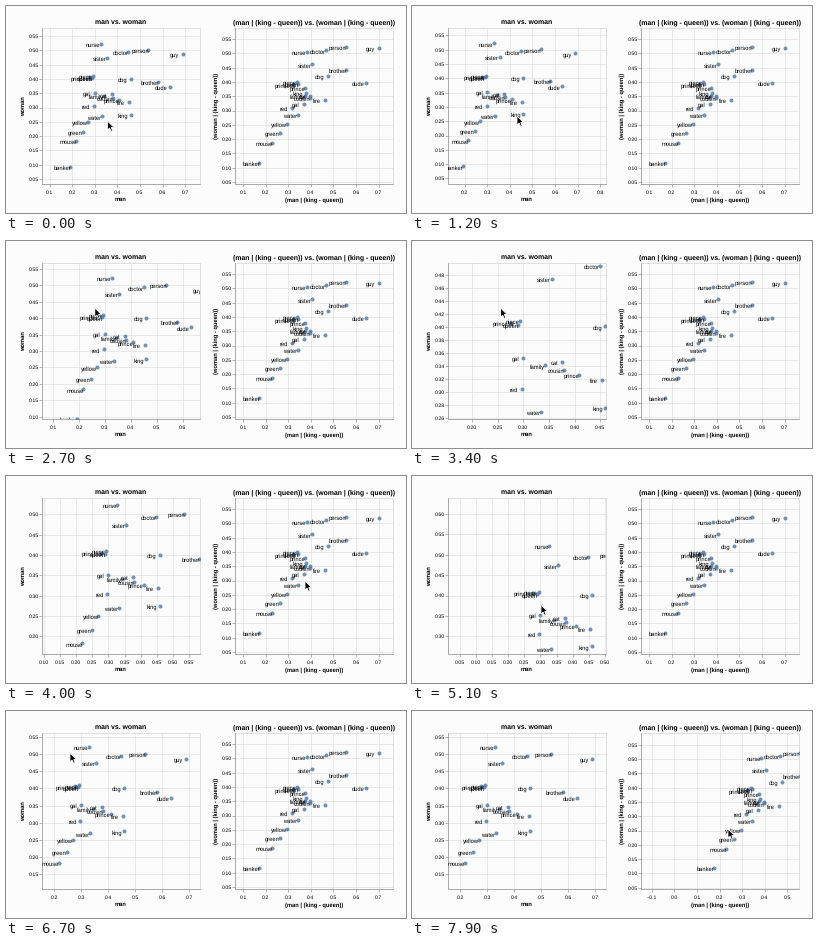
A matplotlib script for the animation above (8000 ms loop, 400 by 207 pixels).

```python
import math

import matplotlib.pyplot as plt
import numpy as np
from matplotlib.animation import FuncAnimation
from matplotlib.collections import LineCollection
from matplotlib.patches import Polygon, Rectangle

plt.rcParams["font.family"] = "Liberation Sans"
plt.rcParams["text.hinting"] = "none"

STAGE_W, STAGE_H = 400, 207
DPI = 128  # a power of two keeps the pixel size exact
FRAMES, INTERVAL = 80, 100
PLOT_W, PLOT_H, TOP = 158, 156, 22
BOTTOM = TOP + PLOT_H
SPAN_X, SPAN_Y = PLOT_W / 226, PLOT_H / 286  # data range at zoom 1
LABEL_DX, LABEL_DY = -7.9, 3.1

# word: left plot x, y, right plot x, y
WORDS = {
    "nurse": (0.328, 0.522, 0.384, 0.504),
    "doctor": (0.449, 0.494, 0.466, 0.510),
    "person": (0.536, 0.501, 0.554, 0.522),
    "guy": (0.689, 0.487, 0.700, 0.519),
    "sister": (0.356, 0.474, 0.407, 0.461),
    "dog": (0.460, 0.401, 0.475, 0.421),
    "brother": (0.580, 0.390, 0.554, 0.442),
    "dude": (0.631, 0.372, 0.643, 0.397),
    "niece": (0.294, 0.409, 0.340, 0.400),
    "princess": (0.276, 0.406, 0.322, 0.391),
    "queen": (0.290, 0.403, 0.345, 0.394),
    "gal": (0.300, 0.352, 0.369, 0.323),
    "family": (0.343, 0.341, 0.374, 0.352),
    "cat": (0.376, 0.346, 0.397, 0.351),
    "cousin": (0.380, 0.334, 0.395, 0.345),
    "prince": (0.409, 0.326, 0.374, 0.379),
    "fire": (0.453, 0.319, 0.462, 0.337),
    "red": (0.297, 0.305, 0.316, 0.309),
    "water": (0.334, 0.269, 0.343, 0.284),
    "king": (0.460, 0.275, 0.378, 0.361),
    "yellow": (0.269, 0.250, 0.294, 0.253),
    "green": (0.248, 0.216, 0.263, 0.221),
    "mouse": (0.217, 0.183, 0.230, 0.186),
    "banker": (0.191, 0.092, 0.173, 0.118),
}

# step, domain left, domain top, domain size relative to the first view
LEFT_VIEWS = np.array([
    (0, 0.0668, 0.578, 1), (5, 0.0668, 0.578, 1),
    (12, 0.1265, 0.576, 1), (14, 0.135, 0.580, 1),
    (18, 0.027, 0.587, 1), (24, 0.027, 0.587, 1),
    (27, 0.0571, 0.5685, 0.8726), (33, 0.1531, 0.4985, 0.4405),
    (34, 0.1531, 0.4985, 0.4405), (37, 0.0937, 0.5398, 0.702),
    (49, 0.0937, 0.5398, 0.702), (51, 0.0128, 0.6394, 0.702),
    (54, 0.1057, 0.5926, 0.702), (57, 0.1057, 0.5926, 0.702),
    (60, 0.0706, 0.6324, 0.834), (62, 0.0706, 0.6324, 0.834),
    (67, 0.1559, 0.5618, 0.834),
])
RIGHT_VIEWS = np.array([
    (0, 0.0647, 0.5885, 1), (74, 0.0647, 0.5885, 1), (79, -0.148, 0.591, 1),
])
# step, x, y of the pointer tip
POINTER_PATH = np.array([
    (0, 101.5, 115), (1, 105, 85), (2, 110, 47.5), (3, 115, 82),
    (4, 118.5, 110.5), (5, 118.5, 110.5), (12, 105, 110), (14, 103, 111),
    (18, 127.5, 113), (22, 89, 67), (37, 88.5, 67), (40, 299, 105),
    (46, 299, 105), (49, 103, 89), (51, 129, 129), (54, 95, 106),
    (60, 95, 106), (62, 87, 66.5), (67, 64, 42), (68, 64, 42),
    (69, 110, 75), (70, 180, 110), (71, 240, 133), (72, 268.5, 117),
    (74, 268.5, 117), (79, 316, 118),
])
ARROW = np.array([(0, 0), (0, 9), (2.1, 7.1), (3.6, 10.4), (5.1, 9.7),
                  (3.7, 6.5), (6.5, 6.4)])


def at_step(path, step):
    return [np.interp(step, path[:, 0], col) for col in path.T[1:]]


def px(size):
    return size * 72 / DPI


def ticks(low, high, count=8):
    """Round tick values and the number of decimals to show."""
    raw = (high - low) / count
    power = 10 ** math.floor(math.log10(raw))
    ratio = raw / power
    factor = 10 if ratio >= 50 ** 0.5 else 5 if ratio >= 10 ** 0.5 \
        else 2 if ratio >= 2 ** 0.5 else 1
    step = factor * power
    first, last = math.ceil(low / step - 1e-6), math.floor(high / step + 1e-6)
    decimals = max(0, -math.floor(math.log10(step) + 1e-9))
    return [i * step for i in range(first, last + 1)], decimals


def tick_text(value, decimals):
    return f"{value:.{decimals}f}".replace("-", "\u2212")


fig = plt.figure(figsize=(STAGE_W / DPI, STAGE_H / DPI), dpi=DPI,
                 facecolor="#fcfcfd")
ax = fig.add_axes([0, 0, 1, 1])
ax.set_xlim(0, STAGE_W)
ax.set_ylim(STAGE_H, 0)
ax.axis("off")


class Panel:
    def __init__(self, left, columns, views, x_name, y_name, y_name_x):
        self.left, self.views = left, views
        self.data = np.array([WORDS[w][columns] for w in WORDS])
        self.grid = self.add_lines("#dddddd", 0.6, 1)
        self.marks = self.add_lines("#888888", 0.6, 2)
        box = Rectangle((left, TOP), PLOT_W, PLOT_H, fill=False,
                        ec="#cccccc", lw=px(0.6), zorder=2)
        ax.add_patch(box)
        ax.plot([left, left, left + PLOT_W], [TOP, BOTTOM, BOTTOM],
                color="#888888", lw=px(0.6), zorder=2)

        self.dots = ax.scatter(*self.data.T, s=px(4) ** 2, c="#4c78a8",
                               alpha=0.8, lw=0, zorder=3)
        self.dots.set_clip_path(box)
        self.labels = [ax.text(0, 0, w, fontsize=px(5.8), ha="center",
                               va="baseline", zorder=4) for w in WORDS]
        for label in self.labels:
            label.set_clip_on(True)
            label.set_clip_path(box)

        self.x_texts = [self.tick_label("center") for _ in range(14)]
        self.y_texts = [self.tick_label("right") for _ in range(14)]
        mid = left + PLOT_W / 2
        bold = dict(ha="center", weight="bold")
        ax.text(mid, 18, f"{x_name} vs. {y_name}", fontsize=px(6.9), **bold)
        ax.text(mid, 195.3, x_name, fontsize=px(5.8), **bold)
        ax.text(y_name_x, TOP + PLOT_H / 2, y_name, fontsize=px(5.8),
                rotation=90, va="center", **bold)

    def add_lines(self, color, width, zorder):
        lines = LineCollection([], colors=color, linewidths=px(width),
                               zorder=zorder)
        return ax.add_collection(lines, autolim=False)

    def tick_label(self, align):
        return ax.text(0, 0, "", fontsize=px(5.3), ha=align, va="baseline")

    def update(self, step):
        x0, y1, size = at_step(self.views, step)
        x1, y0 = x0 + SPAN_X * size, y1 - SPAN_Y * size

        def to_x(v):
            return self.left + (v - x0) / (x1 - x0) * PLOT_W

        def to_y(v):
            return TOP + (y1 - v) / (y1 - y0) * PLOT_H

        grid, marks = [], []
        for text in self.x_texts + self.y_texts:
            text.set_text("")
        values, decimals = ticks(x0, x1)
        for text, v in zip(self.x_texts, values):
            x = to_x(v)
            grid.append([(x, TOP), (x, BOTTOM)])
            marks.append([(x, BOTTOM), (x, BOTTOM + 2.6)])
            text.set_text(tick_text(v, decimals))
            text.set_position((x, 188))
        values, decimals = ticks(y0, y1)
        for text, v in zip(self.y_texts, values):
            y = to_y(v)
            grid.append([(self.left, y), (self.left + PLOT_W, y)])
            marks.append([(self.left - 2.6, y), (self.left, y)])
            text.set_text(tick_text(v, decimals))
            text.set_position((self.left - 3.3, y + 1.9))
        self.grid.set_segments(grid)
        self.marks.set_segments(marks)

        xs, ys = to_x(self.data[:, 0]), to_y(self.data[:, 1])
        self.dots.set_offsets(np.column_stack([xs, ys]))
        for label, x, y in zip(self.labels, xs, ys):
            label.set_position((x + LABEL_DX, y + LABEL_DY))


panels = [
    Panel(36, slice(0, 2), LEFT_VIEWS, "man", "woman", 17),
    Panel(229, slice(2, 4), RIGHT_VIEWS, "(man | (king - queen))",
          "(woman | (king - queen))", 210),
]
pointer = ax.add_patch(Polygon(ARROW, fc="black", ec="white", lw=px(0.8),
                               zorder=9))


def draw(step):
    for panel in panels:
        panel.update(step)
    pointer.set_xy(ARROW + at_step(POINTER_PATH, step))
    return []


anim = FuncAnimation(fig, draw, frames=FRAMES, interval=INTERVAL,
                     init_func=lambda: draw(0), repeat=True, repeat_delay=0)
plt.show()
```
